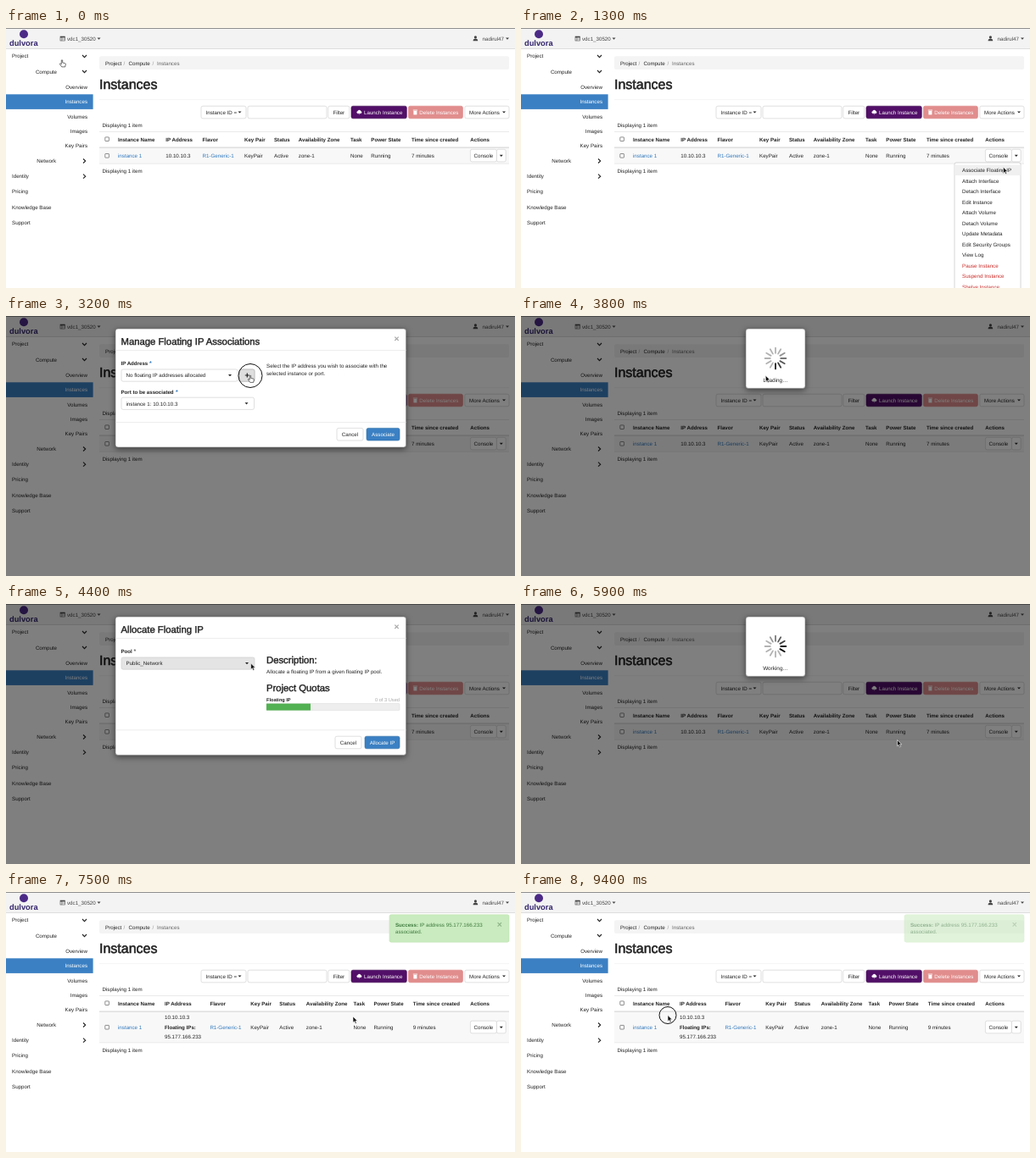
Write an HTML page that moves like this. It is 600 by 307 pixels and loops after 9.5 s.

```html
<!DOCTYPE html>
<html lang="en">
<head>
<meta charset="utf-8">
<title>Associate a floating IP</title>
<style>
  html, body { margin: 0; width: 100%; height: 100%; overflow: hidden; background: #fff; }
  svg { display: block; width: 100%; height: 100%; }
  text { font-family: "Liberation Sans", Arial, sans-serif; text-rendering: geometricPrecision; white-space: pre; }
  .panel { filter: drop-shadow(0 2px 3.5px rgba(0, 0, 0, .5)); }
</style>
</head>
<body>
<svg id="stage" viewBox="0 0 600 307" preserveAspectRatio="none"></svg>
<script>
const LOOP = 9500, STEP = 100;
const INK = '#222', LINK = '#2f78bd', BLUE = '#3b80c3', LINE = '#ccc';

// ---- drawing helpers, each returns SVG markup ----
const text = (x, y, s, o = {}) =>
  `<text x="${x}" y="${y}" font-size="${o.size || 6.2}" fill="${o.fill || INK}" ` +
  `font-weight="${o.bold ? 700 : 400}" text-anchor="${o.anchor || 'start'}"` +
  (o.medium ? ` stroke="${o.fill || INK}" stroke-width="${o.medium}"` : '') + `>${s}</text>`;
const bold = (x, y, s, o = {}) => text(x, y, s, { bold: true, size: 6.15, ...o });
const heading = (x, y, s, size = 11.3) => text(x, y, s, { size, medium: size / 28 });
const rect = (x, y, w, h, fill, stroke = 'none', r = 0) =>
  `<rect x="${x}" y="${y}" width="${w}" height="${h}" rx="${r}" fill="${fill}" stroke="${stroke}" stroke-width=".6"/>`;
const panel = (x, y, w, h) =>
  `<rect class="panel" x="${x}" y="${y}" width="${w}" height="${h}" rx="3" fill="#fff" stroke="#777" stroke-width=".6"/>`;
const path = (d, fill, stroke = 'none', width = 1) =>
  `<path d="${d}" fill="${fill}" stroke="${stroke}" stroke-width="${width}"/>`;
const rule = (x, y, w, color = '#ddd', h = .6) => rect(x, y, w, h, color);
const caret = (x, y, fill = INK) => path(`M${x - 2} ${y - 1}h4l-2 2.2z`, fill);
const chevron = (x, y, right) =>
  path(right ? `M${x - 1.5} ${y - 2.5}l2.7 2.5l-2.7 2.5` : `M${x - 2.5} ${y - 1.3}l2.5 2.6l2.5 -2.6`, 'none', INK, 1.1);
const button = (x, y, w, label, fill = '#fff', stroke = LINE, ink = INK) =>
  rect(x, y, w, 14.6, fill, stroke, 2) + text(x + w / 2, y + 9.5, label, { fill: ink, anchor: 'middle' });
const select = (x, y, w, label, fill = '#fff') =>
  rect(x, y, w, 14.2, fill, LINE, 2) + text(x + 5.5, y + 9.3, label) + caret(x + w - 9, y + 7);
const cross = (x, y, color, r = 2.2) =>
  path(`M${x - r} ${y - r}l${2 * r} ${2 * r}m0 ${-2 * r}l${-2 * r} ${2 * r}`, 'none', color, 1.2);
const plus = path('M281.8 70h5M284.3 67.5v5', 'none', INK, 1.2);
const checkbox = y => rect(116.8, y - 2.3, 4.6, 4.6, '#fff', '#444', .5);
const group = (id, body) => `<g id="${id}">${body}</g>`;

// ---- page ----
function header() {
  return rect(0, 0, 600, 24.5, '#f3f3f3') + rule(0, 0, 600, '#777', .8) + rule(0, 24.2, 600, '#ccc') +
    '<circle cx="21" cy="7.3" r="5" fill="#4b2a86"/>' +
    bold(4, 20.6, 'dulvora', { size: 9.3, fill: '#33246b' }) +
    rect(64, 10, 5.4, 5, 'none', '#444') + rect(64, 10, 5.4, 1.4, '#444') +
    path('M65.8 11v4M65.8 13h3.4', 'none', '#444', .5) +
    text(72, 14.6, 'vdc1_30520', { fill: '#444' }) + caret(109.5, 12.5, '#444') +
    '<circle cx="553.4" cy="10.8" r="1.6" fill="#444"/>' +
    path('M550.6 15.2q0-2.8 2.8-2.8t2.8 2.8z', '#444') +
    text(587, 14.6, 'nadirul47', { fill: '#444', anchor: 'end' }) + caret(591, 12.5, '#444');
}

function sidebar() {
  const left = { Project: 35.4, Identity: 177.4, Pricing: 195.4, 'Knowledge Base': 213.7, Support: 231.8 };
  const right = { Overview: 71.8, Instances: 89.2, Volumes: 106.5, Images: 123.8, 'Key Pairs': 141.2 };
  return rect(0, 78.3, 102.6, 17.6, BLUE) +
    Object.entries(left).map(([s, y]) => text(7, y, s)).join('') +
    Object.entries(right).map(([s, y]) =>
      text(96, y, s, { anchor: 'end', fill: s === 'Instances' ? '#fff' : INK })).join('') +
    text(60, 53.5, 'Compute', { anchor: 'end' }) + text(59, 159.2, 'Network', { anchor: 'end' }) +
    chevron(92.5, 33.3) + chevron(92.5, 51.3) + chevron(92.5, 157, true) + chevron(92.5, 175.2, true);
}

function toolbar() {
  return rect(110, 33.3, 483, 15.8, '#f4f4f4', 'none', 2) +
    text(117, 43.5, 'Project') + text(138.5, 43.5, '/', { fill: '#999' }) +
    text(144.5, 43.5, 'Compute') + text(172.5, 43.5, '/', { fill: '#999' }) +
    text(178, 43.5, 'Instances', { fill: '#666' }) +
    heading(110, 72.2, 'Instances', 16) + rule(110, 84.5, 483, '#eee') +
    rect(230, 92.2, 53, 14.6, '#fff', LINE, 2) + text(235.5, 101.7, 'Instance ID =') + caret(275.5, 99.4) +
    rect(285, 92.2, 93, 14.6, '#fff', LINE, 2) + button(379.8, 92.2, 25, 'Filter') +
    rect(407, 92.2, 65.3, 14.6, '#520f68', '#3f0a50', 2) +
    path('M414.4 100.8a1.4 1.4 0 0 1 .2-2.6a2 2 0 0 1 3.6 0a1.4 1.4 0 0 1 .2 2.6zM416.4 99v3.4', '#fff', '#fff', .4) +
    text(422, 101.7, 'Launch Instance', { fill: '#fff' }) +
    rect(474.4, 92.2, 64, 14.6, '#e18d8d', '#dd8080', 2) +
    rect(480.4, 98, 4, 4.4, '#fff') + rule(479.8, 96.6, 5.2, '#fff', .9) +
    text(487.3, 101.7, 'Delete Instances', { fill: '#fff' }) +
    rect(540.8, 92.2, 52.2, 14.6, '#fff', LINE, 2) + text(546, 101.7, 'More Actions') + caret(587, 99.4);
}

const TITLES = ['Instance Name', 'IP Address', 'Flavor', 'Key Pair', 'Status',
  'Availability Zone', 'Task', 'Power State', 'Time since created', 'Actions'];

function table(columns, height, age, addresses) {
  const mid = 141.3 + height / 2, base = mid + 2;
  const cells = ['instance 1', '', 'R1-Generic-1', 'KeyPair', 'Active', 'zone-1', 'None', 'Running', age];
  return text(113.5, 116.8, 'Displaying 1 item') + rule(110, 122, 483) +
    checkbox(131.2) + TITLES.map((s, i) => bold(columns[i], 133.5, s)).join('') +
    rect(110, 140.8, 483, height, '#f8f8f8') + rule(110, 140.6, 483, '#ccc', .9) +
    rule(110, 140.8 + height, 483) + checkbox(mid) +
    cells.map((s, i) => text(columns[i], base, s, { fill: i === 0 || i === 2 ? LINK : INK })).join('') +
    addresses + button(547.4, mid - 7.5, 31, 'Console') +
    rect(578.4, mid - 7.5, 10.8, 14.6, '#fff', LINE, 2) + caret(583.8, mid) +
    text(113.5, 152.2 + height, 'Displaying 1 item');
}

const tableBefore = table([132, 188.3, 231.5, 281, 316, 344.8, 406, 430.3, 478, 547.3], 19,
  '7 minutes', text(188.3, 152.6, '10.10.10.3'));
const tableAfter = table([132, 187, 240.4, 288.3, 322.3, 353.8, 409.6, 433.4, 479.8, 547.3], 36.8,
  '9 minutes', text(187, 150, '10.10.10.3') + bold(187, 161.8, 'Floating IPs:') + text(187, 173, '95.177.166.233'));

function actionMenu() {
  const items = ['Associate Floating IP', 'Attach Interface', 'Detach Interface', 'Edit Instance',
    'Attach Volume', 'Detach Volume', 'Update Metadata', 'Edit Security Groups', 'View Log',
    'Pause Instance', 'Suspend Instance', 'Shelve Instance'];
  return rect(511, 159, 78, 160, '#fff', '#bbb', 2) + rect(511.4, 161.6, 77.2, 12.5, '#f0f0f0') +
    items.map((s, i) => text(520, 170 + i * 12.5, s, { fill: i > 8 ? '#c9302c' : INK })).join('');
}

function alertBox() {
  const ink = { fill: '#3f7a3f' };
  return rect(452, 26.8, 141, 32.4, '#c9ebbf', '#bfe3b0', 2) +
    bold(459, 41, 'Success:', ink) + text(487.5, 41, 'IP address 95.177.166.233', ink) +
    text(459, 49.3, 'associated.', ink) + cross(581.8, 38.4, '#8fb487');
}

// ---- dialogs ----
const frame = (height, title) =>
  panel(129, 15, 342.6, height) + heading(135.5, 33.6, title) + cross(460.5, 26.8, '#aaa') +
  rule(129, 40.2, 342.6, '#e2e2e2') + rule(129, height - 14.8, 342.6, '#e2e2e2');
const required = (y, s, starX, color) =>
  bold(135.5, y, s) + bold(starX, y, '*', { fill: color, size: 7 });
const primary = (x, y, w, s) => button(x, y, w, s, BLUE, '#2e6da4', '#fff');

const manageDialog = address =>
  frame(140, 'Manage Floating IP Associations') +
  required(58.3, 'IP Address', 169, LINK) + select(136, 63, 137, address) +
  rect(275, 63, 18, 14.2, '#fff', LINE, 2) + plus +
  required(91.6, 'Port to be associated', 200, LINK) + select(136, 96.2, 156.5, 'instance 1: 10.10.10.3') +
  text(307, 61.4, 'Select the IP address you wish to associate with the') +
  text(307, 69.6, 'selected instance or port.') +
  button(390, 132.4, 31, 'Cancel') + primary(425, 132.4, 39, 'Associate');

const allocateDialog = () =>
  frame(163.4, 'Allocate Floating IP') + required(58.3, 'Pool', 150.5, '#666') +
  select(136, 63, 157, 'Public_Network', '#e4e4e4') +
  heading(307, 70.4, 'Description:') + text(307, 82.2, 'Allocate a floating IP from a given floating IP pool.') +
  heading(307, 103.2, 'Project Quotas') + bold(307, 115.2, 'Floating IP', { size: 5.6 }) +
  text(464, 115.2, '0 of 3 Used', { size: 5.7, fill: '#aaa', anchor: 'end' }) +
  rect(307, 117.6, 157, 8, '#eee', '#ddd', 1) + rect(307, 117.6, 52, 8, '#52b152') +
  button(388, 156.2, 31, 'Cancel') + primary(423, 156.2, 41, 'Allocate IP');

const SPOKES = 12;
const busyDialog = panel(265, 15, 70, 70.4) +
  group('spinner', Array.from({ length: SPOKES }, (_, i) =>
    `<rect x="-.9" y="-13.3" width="1.8" height="8" rx=".9" transform="translate(300 50) rotate(${i * 360 / SPOKES})"/>`).join('')) +
  `<text id="busyLabel" x="300" y="78.4" font-size="6.4" text-anchor="middle" fill="${INK}"></text>`;

const arrow = path('M0 0v7.2l1.7-1.5l1.2 2.7l1.3-.6l-1.2-2.6h2.3z', '#111', '#fff', .6);
const hand = path('M-.7 0q.7-.9 1.4 0v3l3 .7q.8.3.6 1.2l-.6 3h-4l-2.4-3.4q.2-1 1.2-.4l.8.7z', '#fff', '#111', .6);

const stage = document.getElementById('stage');
stage.innerHTML = rect(0, 0, 600, 307, '#fff') + header() + sidebar() + toolbar() +
  group('before', tableBefore) + group('after', tableAfter) + group('menu', actionMenu()) +
  group('alert', alertBox()) + group('dim', rect(0, 0, 600, 307, '#000')) +
  group('manageEmpty', manageDialog('No floating IP addresses allocated')) +
  group('plusHover', rect(275, 63, 18, 14.2, '#dedede', '#aaa', 2) + plus) +
  group('allocate', allocateDialog()) + group('manageFilled', manageDialog('95.177.166.233')) +
  group('busy', busyDialog) +
  '<circle id="ring" fill="none" stroke="#111" stroke-width="1"/>' +
  group('cursor', group('arrow', arrow) + group('hand', hand));

const el = Object.fromEntries([...stage.querySelectorAll('[id]')].map(n => [n.id, n]));
const spokes = [...el.spinner.children];

// ---- timeline ----
const POINTER = [[100, 66, 38], [900, 584, 149], [1100, 584, 149], [1400, 563, 169.5], [2700, 563, 169.5],
  [3100, 288, 70.5], [4800, 288.7, 70], [5400, 443.5, 160.5], [6400, 443.5, 160.5], [6700, 444, 139],
  [7200, 444, 139], [7500, 409, 147], [8200, 173, 145.5]];
const CLICKS = [1000, 1500, 3100, 5500, 6800, 9400];
const HANDS = [[0, 200], [900, 1300], [3100, 3400]];
const BUSY = [[1800, 2400, 'Loading…'], [3400, 4100, 'Loading…'], [5800, 6200, 'Working…'], [7000, 7300, 'Working…']];

const clamp = v => Math.max(0, Math.min(1, v));
const within = (t, a, b) => t >= a && t < b;
const opacity = (node, v) => node.setAttribute('opacity', v);
const fadeIn = (t, a, b) => within(t, a, b) ? clamp((t - a + STEP) / 250) : 0;

function pointerAt(t) {
  const next = POINTER.findIndex(p => p[0] > t);
  if (next === 0) return POINTER[0].slice(1);
  if (next < 0) return POINTER[POINTER.length - 1].slice(1);
  const [t0, x0, y0] = POINTER[next - 1], [t1, x1, y1] = POINTER[next];
  const p = (t - t0) / (t1 - t0), e = p * p * (3 - 2 * p);
  return [x0 + (x1 - x0) * e, y0 + (y1 - y0) * e];
}

function drawBusy(t) {
  const job = BUSY.find(([a, b]) => within(t, a, b));
  opacity(el.busy, job ? 1 : 0);
  if (!job) return;
  el.busyLabel.textContent = job[2];
  const head = .34 + (t - job[0] - STEP) * .0008;
  spokes.forEach((spoke, i) => {
    const lag = ((head - i / SPOKES) % 1 + 1) % 1;
    opacity(spoke, Math.max(.3, 1 - 1.4 * lag));
  });
}

function draw(t) {
  const done = t >= 7300;
  opacity(el.before, done ? 0 : 1);
  opacity(el.after, done ? 1 : 0);
  opacity(el.menu, within(t, 1100, 1800) ? 1 : 0);
  opacity(el.dim, within(t, 1800, 7300) ? Math.min(.5, (t - 1700) / 400) : 0);
  opacity(el.manageEmpty, fadeIn(t, 2400, 3400));
  opacity(el.plusHover, within(t, 3100, 3400) ? 1 : 0);
  opacity(el.allocate, fadeIn(t, 4100, 5800));
  opacity(el.manageFilled, fadeIn(t, 6200, 7000));
  const fade = clamp((t - 8700) / 1500);
  opacity(el.alert, done ? .5 + .5 * Math.cos(Math.PI * fade) : 0);
  drawBusy(t);

  const [x, y] = pointerAt(t);
  el.cursor.setAttribute('transform', `translate(${x} ${y})`);
  const overLink = HANDS.some(([a, b]) => within(t, a, b));
  opacity(el.hand, overLink ? 1 : 0);
  opacity(el.arrow, overLink ? 0 : 1);

  const click = CLICKS.find(c => within(t, c, c + 300));
  opacity(el.ring, click === undefined ? 0 : t - click < 200 ? 1 : .4);
  if (click !== undefined) {
    el.ring.setAttribute('cx', x);
    el.ring.setAttribute('cy', y);
    el.ring.setAttribute('r', 10 + (t - click) * .04);
  }
}

const start = performance.now();
function tick() {
  const t = (performance.now() - start) % LOOP;
  draw(Math.floor(t / STEP) * STEP);
  requestAnimationFrame(tick);
}
tick();
</script>
</body>
</html>
```
